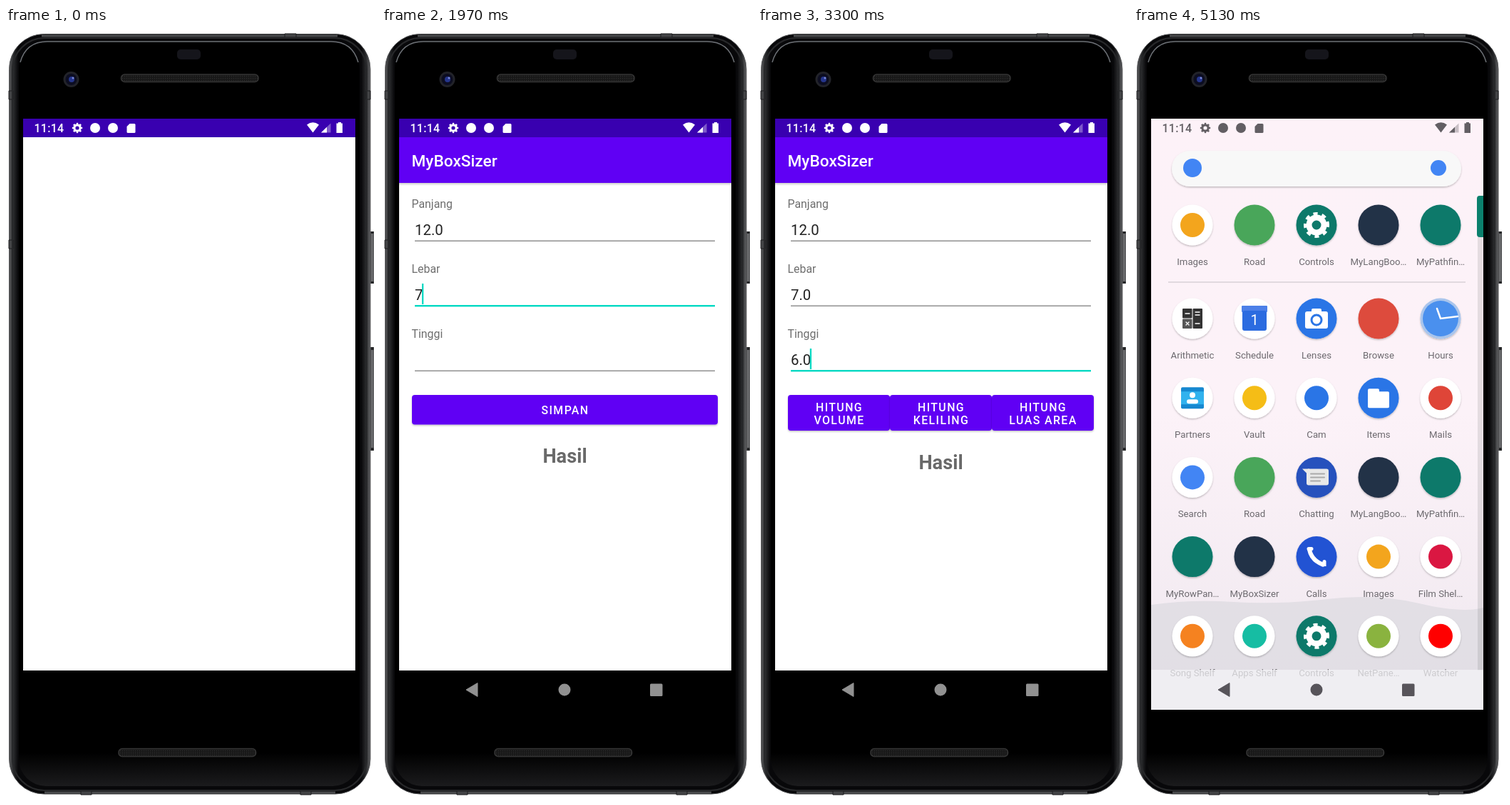
These frames come from a looping animation (519x1080 px, 5160 ms). An HTML page:

```html
<!DOCTYPE html>
<html lang="id">
<head>
<meta charset="utf-8">
<title>Form test</title>
<style>
html, body { margin: 0; width: 100%; height: 100%; overflow: hidden; background: #fff; }
svg { display: block; width: 100%; height: 100%; font-family: Roboto, sans-serif; }
.mid { text-anchor: middle; }
.label { font-size: 15.9px; fill: #6e6e6e; }
.value { font-size: 20.4px; fill: #212121; }
.button { font-size: 15.9px; font-weight: 500; letter-spacing: 1.4px; fill: #fff; text-anchor: middle; }
.result { font-size: 27.2px; font-weight: 700; fill: #696969; text-anchor: middle; }
.app { font-size: 13.2px; fill: #6c696e; text-anchor: middle; }
</style>
</head>
<body>
<svg viewBox="0 0 519 1080">
  <defs>
    <linearGradient id="rim">
      <stop offset="0" stop-color="#58595b"/><stop offset=".012" stop-color="#292a2c"/>
      <stop offset=".025" stop-color="#08080a"/><stop offset=".975" stop-color="#08080a"/>
      <stop offset=".988" stop-color="#292a2c"/><stop offset="1" stop-color="#606163"/>
    </linearGradient>
    <linearGradient id="glass" x2="0" y2="1">
      <stop offset="0"/><stop offset=".955"/><stop offset="1" stop-color="#1b1b1d"/>
    </linearGradient>
    <linearGradient id="key"><stop offset="0" stop-color="#303133"/><stop offset=".6" stop-color="#77787a"/><stop offset="1" stop-color="#3c3d3f"/></linearGradient>
    <linearGradient id="wall" x2="0" y2="1">
      <stop offset="0" stop-color="#fdf2f8"/><stop offset=".5" stop-color="#fcf2f8"/><stop offset="1" stop-color="#efe8ef"/>
    </linearGradient>
    <linearGradient id="drop" x2="0" y2="1"><stop offset="0" stop-color="#000" stop-opacity=".2"/><stop offset="1" stop-color="#000" stop-opacity="0"/></linearGradient>
    <filter id="shadow" x="-10%" y="-20%" width="120%" height="150%"><feDropShadow dx="0" dy="1.4" stdDeviation="1.2" flood-opacity=".25"/></filter>
    <pattern id="mesh" width="3" height="3" patternUnits="userSpaceOnUse"><rect width="3" height="3" fill="#181818"/><circle cx="1.5" cy="1.5" r=".7" fill="#303030"/></pattern>
    <clipPath id="display"><rect x="24" y="127" width="466" height="828"/></clipPath>
    <g id="gear" fill="none" stroke="currentColor">
      <circle r="4.2" stroke-width="3.2"/>
      <circle r="6.1" stroke-width="2.2" pathLength="16" stroke-dasharray="1 1" stroke-dashoffset=".5"/>
    </g>
    <g id="keys" fill="currentColor">
      <path d="M118 927L134 917.5V936.5Z" stroke="currentColor" stroke-linejoin="round"/>
      <circle cx="256" cy="927" r="8.5"/>
      <rect x="376" y="918.5" width="17.5" height="17.5" rx="1.5"/>
    </g>
  </defs>

  <g id="casing">
    <path d="M510 285h6v73h-6zM510 447h6v145h-6z" fill="url(#key)"/>
    <path d="M512 285h4v3h-4zM512 355h4v3h-4zM512 447h4v4h-4zM512 588h4v4h-4z" fill="#252628"/>
    <rect x="4.5" y="8.5" width="506.5" height="1064.5" rx="49" fill="url(#rim)" stroke="#505153"/>
    <path d="M50 11H465M54 1071H462" stroke="#4b4c4e" stroke-width="3"/>
    <path d="M4 88h6v12H4zM505 88h6v12h-6zM4 297h6v12H4zM391 8h16v5h-16zM105 1069h15v5h-15zM413 1069h15v5h-15z" fill="#434446" stroke="#1c1d1f"/>
    <rect x="9" y="14" width="497" height="1054" rx="45" fill="none" stroke="#27282a" stroke-width="2"/>
    <rect x="18" y="19" width="478" height="1043" rx="38" fill="url(#glass)"/>
    <path d="M20 48Q28 19 58 19H456Q486 19 494 48" fill="none" stroke="#6d7176" stroke-width="1.5"/>
    <rect x="240" y="30" width="33" height="14" rx="5" fill="#15151b"/>
    <circle cx="91.5" cy="72" r="11" fill="#222329"/>
    <circle cx="91.5" cy="72" r="8" fill="#0c0d21"/>
    <circle cx="92" cy="72" r="4" fill="#25358b"/>
    <circle cx="94" cy="70" r="1.5" fill="#7c8ad6"/>
    <g fill="url(#mesh)" stroke="#353535" stroke-width="1.5">
      <rect x="161.5" y="65" width="192.5" height="10.5" rx="5"/>
      <rect x="158" y="1009.5" width="192.5" height="11" rx="5"/>
    </g>
    <rect x="24" y="127" width="466" height="828" fill="#000"/>
  </g>

  <g clip-path="url(#display)">
    <rect x="24" y="127" width="466" height="773" fill="#fff"/>
    <rect x="24" y="127" width="466" height="26" fill="#3900b0"/>
    <use id="appKeys" href="#keys" color="#919191"/>

    <g id="form">
      <rect x="24" y="153" width="466" height="64" fill="#6000f4"/>
      <rect x="24" y="217" width="466" height="4" fill="url(#drop)"/>
      <text x="41.5" y="194" font-size="22.7" font-weight="500" fill="#fff">MyBoxSizer</text>
      <g id="fields"></g>
      <rect id="cursor" width="2.3" height="29" fill="#00d9c3"/>
      <g id="save">
        <rect x="42" y="514" width="429" height="41.5" rx="4" fill="#6000f4" filter="url(#shadow)"/>
        <text class="button" x="257" y="541">SIMPAN</text>
      </g>
      <g id="choices"></g>
      <text id="result" class="result" x="256.5"></text>
    </g>

    <g id="launcher">
      <rect x="24" y="127" width="466" height="828" fill="url(#wall)"/>
      <path d="M24 808Q80 800 140 804T270 800T400 806T490 812V955H24Z" fill="#dfdde3" opacity=".8"/>
      <rect x="53" y="172" width="406" height="50" rx="25" fill="#f8f8f8" filter="url(#shadow)"/>
      <circle cx="82" cy="196" r="13" fill="#4285f4"/>
      <circle cx="427" cy="196" r="11" fill="#4285f4"/>
      <path d="M48 356H465" stroke="#d8d1d7" stroke-width="1.5"/>
      <g id="apps"></g>
      <rect x="482" y="235" width="7.5" height="665" fill="#777" opacity=".18"/>
      <rect x="481" y="235" width="12" height="58" rx="4" fill="#0b806d"/>
      <rect x="24" y="899" width="466" height="56" fill="#f6f5f8" opacity=".7"/>
      <use href="#keys" color="#57545a"/>
    </g>

    <g id="status" fill="currentColor">
      <text x="39.5" y="146" font-size="15.9" font-weight="500" letter-spacing=".3">11:14</text>
      <use href="#gear" transform="translate(100 140)"/>
      <circle cx="125" cy="140" r="7"/>
      <circle cx="150" cy="140" r="7"/>
      <path d="M173.5 134H180q1.5 0 1.5 1.5v10q0 1.5-1.5 1.5h-9q-1.5 0-1.5-1.5v-7.5z"/>
      <path d="M422 135.5Q430.5 129 439 135.5L430.5 146.5Z"/>
      <path d="M442 146.5L455.5 133.5V146.5Z" opacity=".35"/>
      <path d="M442 146.5L450 138.8V146.5Z"/>
      <path d="M466 132h4v1.5h2V147h-8.5V133.5h2.5z"/>
    </g>
  </g>
</svg>

<script>
const $ = id => document.getElementById(id);
const LOOP = 5160, FORM = 830, CHOICES = 3040, RESULT = 3700, CLOSE = 4400;

const fields = [
  { label: 'Panjang', value: '12.0', focus: 830, typing: 1180 },
  { label: 'Lebar', value: '7.0', focus: 1900, typing: 1960 },
  { label: 'Tinggi', value: '6.0', focus: 2650, typing: 2740 }
];
const KEY_GAP = 50;

$('fields').innerHTML = fields.map(({ label }, i) => `
  <g transform="translate(0 ${i * 91})">
    <text class="label" x="41.5" y="252">${label}</text>
    <text class="value" x="46" y="289.5"></text>
    <rect class="line" x="46" width="421"/>
  </g>`).join('');
const values = document.querySelectorAll('.value');
const lines = document.querySelectorAll('.line');

$('choices').innerHTML = ['VOLUME', 'KELILING', 'LUAS AREA'].map((name, i) => `
  <g transform="translate(${42 + i * 143} 514)">
    <rect width="143" height="50" rx="4" fill="#6000f4" filter="url(#shadow)"/>
    <text class="button" x="72" y="22.5">HITUNG</text>
    <text class="button" x="72" y="41">${name}</text>
  </g>`).join('');

// Pictograms are centred on their disc.
const box = (x, y, w, h, fill, rx = 1) =>
  `<rect x="${x}" y="${y}" width="${w}" height="${h}" rx="${rx}" fill="${fill}"/>`;
const dot = (r, fill, x = 0, y = 0) => `<circle cx="${x}" cy="${y}" r="${r}" fill="${fill}"/>`;
const stroke = (d, color, width) =>
  `<path d="${d}" fill="none" stroke="${color}" stroke-width="${width}" stroke-linecap="round"/>`;
const gear = '<use href="#gear" color="#fff" transform="scale(2.5)"/>';
const keypad = box(-14, -14, 13.5, 13.5, '#333') + box(.5, -14, 13.5, 28, '#333') + box(-14, .5, 13.5, 13.5, '#555')
  + stroke('M-10-7h6M4-9h6M4-5h6M-9 5l4 4M-5 5l-4 4M4 7h6', '#fff', 1.3);
const dayPad = box(-18, -18, 36, 9, '#4c80e8') + box(-17, -11, 34, 28, '#2b6be0', 3)
  + '<text class="mid" y="9" font-size="20" fill="#fff">1</text>';
const lens = box(-16, -10, 32, 24, '#fff', 3) + box(-7, -14, 14, 8, '#fff', 2) + dot(8.5, '#2a75e6', 0, 2) + dot(5.5, '#fff', 0, 2);
const dial = dot(25, '#4a90ee') + stroke('M-5-14L0 0L24-3', '#fff', 2.5);
const card = box(-16, -15, 32, 30, '#1688d0', 2) + box(-16, -9, 32, 18, '#31b2ee', 0) + dot(4, '#fff', 0, -4) + box(-8, 2, 16, 6, '#fff', 3);
const folder = box(-15, -13, 16, 10, '#fff', 2) + box(-15, -9, 30, 23, '#fff', 2);
const bubble = box(-14, -12, 31, 23, '#e8e8e8', 3) + '<path d="M-20-12h10v10z" fill="#e8e8e8"/>' + stroke('M-8-5h19M-8 0h19M-8 5h13', '#aaa', 2);
const handset = stroke('M-10-10Q-7 5 9 11', '#fff', 6) + stroke('M-11-11h4M8 11h3v-4', '#fff', 5);

const TEAL = '#08796b', NAVY = '#243047', BLUE = '#2a75e6', WHITE = '#fff';
const plain = color => [WHITE, dot(17, color)];
const images = ['Images', ...plain('#f3a51d')], road = ['Road', '#4aa65a', ''];
const controls = ['Controls', TEAL, gear], lang = ['MyLangBoo…', NAVY, ''], path = ['MyPathfin…', TEAL, ''];
const apps = [
  images, road, controls, lang, path,
  ['Arithmetic', WHITE, keypad], ['Schedule', WHITE, dayPad], ['Lenses', BLUE, lens], ['Browse', '#dd4b3e', ''], ['Hours', '#a9c5ec', dial],
  ['Partners', WHITE, card], ['Vault', ...plain('#f5bd16')], ['Cam', ...plain(BLUE)], ['Items', BLUE, folder], ['Mails', ...plain('#df4538')],
  ['Search', ...plain('#4285f4')], road, ['Chatting', '#2751bd', bubble], lang, path,
  ['MyRowPan…', TEAL, ''], ['MyBoxSizer', NAVY, ''], ['Calls', '#2253d3', handset], images, ['Film Shel…', ...plain('#da1742')],
  ['Song Shelf', ...plain('#f58220')], ['Apps Shelf', ...plain('#16bda3')], controls, ['NetPane…', ...plain('#8ab33f')], ['Watcher', ...plain('#f00')]
];
$('apps').innerHTML = apps.map(([name, disc, art], i) => {
  const row = Math.floor(i / 5), y = row ? 407 + (row - 1) * 111.2 : 276;
  return `<g transform="translate(${82 + i % 5 * 87} ${y})">
    <circle r="28.5" fill="${disc}" filter="url(#shadow)"/>${art}
    <text class="app" y="56">${name}</text></g>`;
}).join('');

const show = (id, on) => $(id).setAttribute('display', on ? 'inline' : 'none');
const ramp = (t, start, length) => Math.min(1, Math.max(0, (t - start) / length));

function drawFields(t) {
  const active = fields.findLastIndex(f => t >= f.focus);
  fields.forEach(({ value, typing }, i) => {
    const typed = t < typing ? 0 : Math.floor((t - typing) / KEY_GAP) + 1;
    const focused = i === active;
    values[i].textContent = value.slice(0, typed);
    lines[i].setAttribute('y', focused ? 297 : 297.6);
    lines[i].setAttribute('height', focused ? 2.4 : 1.3);
    lines[i].setAttribute('fill', focused ? '#00d9c3' : '#818181');
    if (!focused) return;
    const typedAt = typing + (value.length - 1) * KEY_GAP;
    const blinkStart = t >= typedAt ? typedAt : t;
    $('cursor').setAttribute('x', 45.5 + (typed ? values[i].getComputedTextLength() - 1 : 0));
    $('cursor').setAttribute('y', 267 + i * 91);
    show('cursor', (t - blinkStart) % 1000 < 500);
  });
}

function draw(t) {
  const choosing = t >= CHOICES && t < RESULT;
  show('form', t >= FORM);
  drawFields(Math.max(t, FORM));
  show('save', !choosing);
  show('choices', choosing);
  $('result').textContent = t < RESULT ? 'Hasil' : '100.0';
  $('result').setAttribute('y', choosing ? 617.5 : 609);
  $('appKeys').setAttribute('opacity', ramp(t, 30, 200));
  const closing = ramp(t, CLOSE, 130);
  show('launcher', closing > 0);
  $('launcher').setAttribute('opacity', closing);
  $('status').setAttribute('color', closing > .5 ? '#625e63' : '#fff');
}

const start = performance.now();
function tick() {
  draw((performance.now() - start) % LOOP);
  requestAnimationFrame(tick);
}
tick();
</script>
</body>
</html>
```
